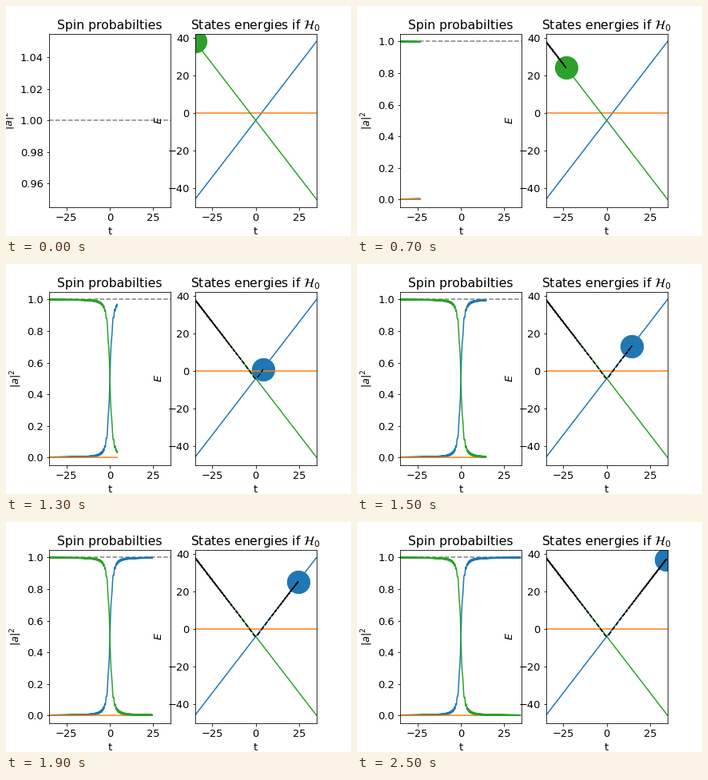
A matplotlib script that plays this animation: 432 by 288 pixels, repeating every 2600 ms.

```python
import numpy as np
import matplotlib.pyplot as plt
from matplotlib.animation import FuncAnimation

FRAMES, INTERVAL = 26, 100
STEPS = 100                      # solver samples per frame
T_MAX, SLOPE, SHIFT, COUPLING = 35, 1.2, -4, 2.0
SOFT, PACE = 1.3, 96.6           # samples thin out around the crossing
BLUE, ORANGE, GREEN = "C0", "C1", "C2"

plt.rcParams.update({"font.size": 13, "font.family": "DejaVu Sans"})


def sample_times():
    grid = np.linspace(-T_MAX, T_MAX + 1, 20001)
    work = grid * np.hypot(grid, SOFT) + SOFT**2 * np.arcsinh(grid / SOFT)
    k = np.arange((FRAMES - 1) * STEPS + 1)
    return np.interp(work[0] + k * PACE / STEPS, work, grid)


def evolve(times, substeps=4):
    """Probability of the rising state, starting in the falling one."""
    up, down = 0j, 1 + 0j
    prob = [0.0]
    for start, end in zip(times[:-1], times[1:]):
        dt = (end - start) / substeps
        for j in range(substeps):
            bias = SLOPE * (start + (j + 0.5) * dt)
            omega = np.hypot(bias, COUPLING)
            c, s = np.cos(omega * dt), -1j * np.sin(omega * dt) / omega
            up, down = (c * up + s * (bias * up + COUPLING * down),
                        c * down + s * (COUPLING * up - bias * down))
        prob.append(abs(up) ** 2)
    return np.array(prob)


t = sample_times()
p_up = evolve(t)
probs = [p_up, np.zeros_like(t), 1 - p_up]
energy = SLOPE * t * (2 * p_up - 1) + SHIFT

fig, (left, right) = plt.subplots(1, 2, figsize=(6, 4), dpi=72)
fig.subplots_adjust(left=0.125, right=0.9, bottom=0.125, top=0.88, wspace=0.2)

left.set(title="Spin probabilties", xlabel="t", ylabel="$|a|^2$",
         xlim=(-T_MAX, T_MAX))
left.axhline(1, color="gray", ls="--")
curves = [left.plot([], [], color=c)[0] for c in (BLUE, ORANGE, GREEN)]

right.set(title=r"States energies if $\mathcal{H}_0$", xlabel="t",
          ylabel="$E$", xlim=(-T_MAX, T_MAX), ylim=(-50.2, 42.2))
ends = np.array([-T_MAX, T_MAX])
for slope, shift, color in ((SLOPE, SHIFT, BLUE), (0, 0, ORANGE),
                            (-SLOPE, SHIFT, GREEN)):
    right.plot(ends, slope * ends + shift, color=color)
trail, = right.plot([], [], "k--")
ball = right.scatter([t[0]], [energy[0]], s=800, color=GREEN)


def draw(frame):
    n = frame * STEPS
    left.set_ylim((-0.05, 1.05) if frame else (0.945, 1.055))
    for curve, prob in zip(curves, probs):
        curve.set_data(t[:n], prob[:n])
    trail.set_data(t[:n], energy[:n])
    ball.set_offsets([[t[n], energy[n]]])
    ball.set_color(BLUE if p_up[n] > 0.5 else GREEN)
    return [*curves, trail, ball]


anim = FuncAnimation(fig, draw, frames=FRAMES, interval=INTERVAL,
                     init_func=lambda: draw(0), repeat=True, blit=False)
plt.show()
```
